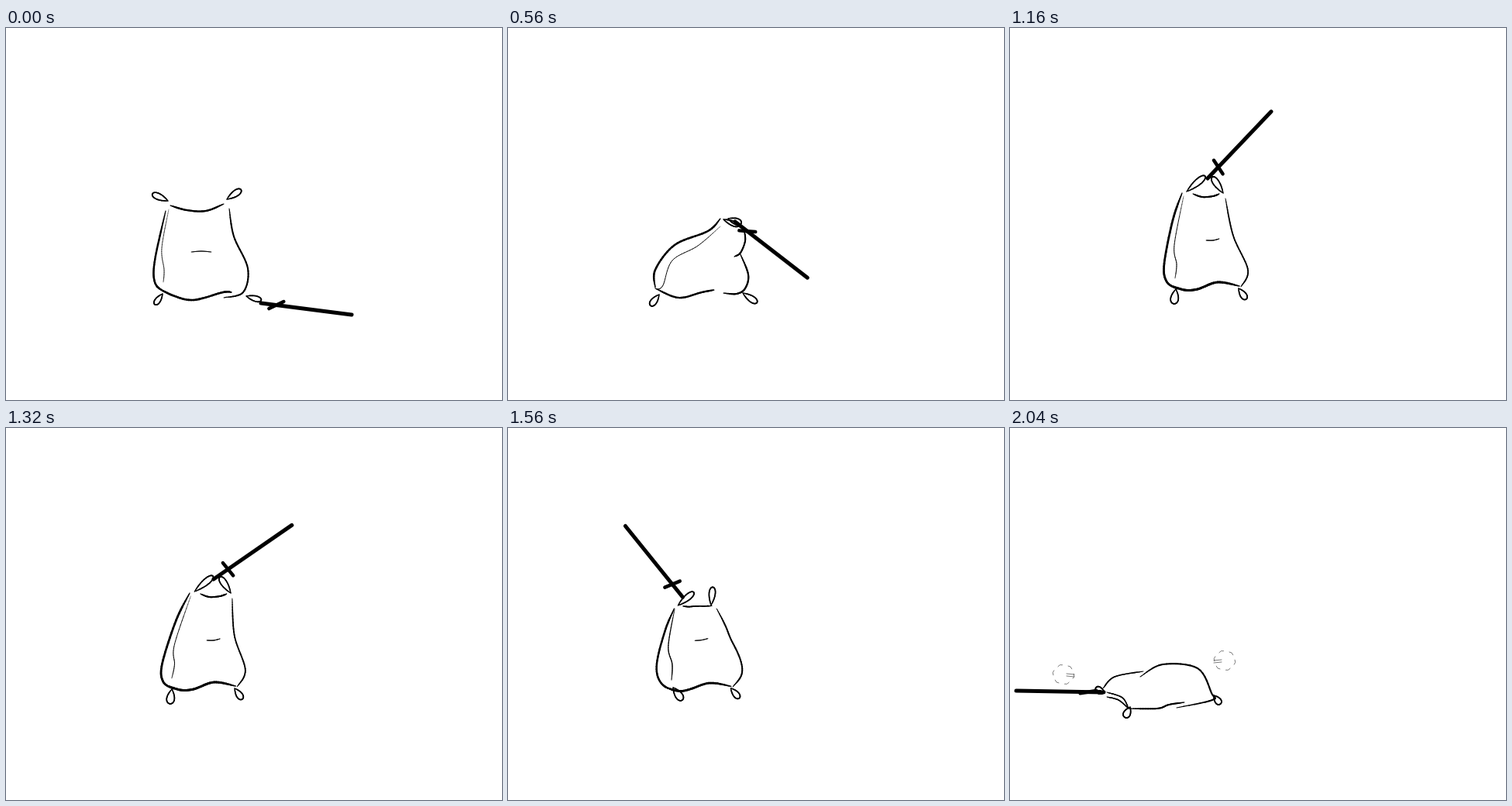
An HTML page with a canvas that plays this animation: 640x480 px, repeating every 2200 ms.

```html
<!DOCTYPE html>
<html>
<head>
<meta charset="utf-8">
<title>Sack with sword</title>
<style>
html, body { margin: 0; width: 100%; height: 100%; overflow: hidden; background: #fff; }
canvas { display: block; }
</style>
</head>
<body>
<canvas id="c" width="640" height="480"></canvas>
<script>
const ctx = document.getElementById('c').getContext('2d');
const LOOP = 2200, SAMPLES = 40, RAD = Math.PI / 180;

// From each start time on, drawings are held for the given time.
const beats = [[0, 120], [120, 40], [280, 120], [400, 80], [640, 40], [800, 280], [1080, 40],
  [1200, 80], [1360, 40], [1680, 80], [1920, 120]];

// curves: width, then key points of top, left, bottom, right, seam, crease.
// leaves: x, y, angle, length, half width of the two ears and two feet.
const rest = {
  curves: [
    [2.3, 212,229, 233,235, 258,236, 281,227],
    [2.4, 206,236, 192,300, 192,328, 203,340],
    [2.6, 194,334, 215,345, 242,351, 280,341, 291,341],
    [2.1, 288,233, 294,269, 312,310, 306,341, 281,348],
    [0.7, 210,234, 201,284, 204,312, 203,328],
    [0.9, 239,289, 252,288, 265,289]],
  leaves: [[209,223, -156,22,4], [285,221, -34,22,4], [202,343, 126,17,3.5], [310,346, 15,20,3.5]]
};
const bow = {
  curves: [
    [2.1, 302,324, 312,320, 328,320],
    [2.6, 333,314, 305,296, 274,281, 240,288, 200,295, 182,322, 190,340],
    [2.1, 205,346, 258,346, 275,344, 295,345],
    [1, 299,326, 296,340],
    [2.1, 296,333, 268,315, 240,303, 208,308, 200,325, 201,338],
    [0.9, 235,306, 245,311, 257,314]],
  leaves: [[333,315, 78,25,4.5], [298,329, 34,25,5], [199,343, 146,26,4], [295,341, 19,28,4]]
};
const grab = {
  curves: [
    [2, 305,262, 306,275, 300,290, 292,295],
    [2.5, 274,246, 258,262, 215,280, 190,312, 190,335],
    [2.3, 190,336, 220,348, 250,341, 266,338],
    [2.2, 299,290, 310,318, 306,336, 295,343, 278,342],
    [0.9, 274,256, 245,281, 212,300, 200,332, 192,337],
    [0, 250,285, 266,285]],
  leaves: [[278,247, 23,21,3], [284,246, 19,18,4], [195,344, 128,18,4], [303,342, 34,22,4]]
};
const raise = {
  curves: [
    [2, 236,214, 248,218, 262,217, 270,214],
    [2.7, 222,213, 210,248, 199,304, 202,327, 216,337],
    [3, 207,332, 225,338, 242,337, 268,328, 296,333],
    [1.8, 278,220, 288,268, 307,312, 298,334],
    [0.9, 224,217, 212,280, 215,305, 213,323],
    [0.9, 253,274, 262,274, 270,272]],
  leaves: [[228,211, -40,31,4], [275,213, -124,25,4], [214,337, 98,19,5], [295,336, 55,17,4]]
};
const dive = {
  curves: [
    [1.2, 152,259, 165,252, 196,258],
    [2, 145,270, 157,298, 182,330, 205,341],
    [2.3, 192,338, 212,341, 240,331, 272,334],
    [2.3, 202,257, 250,276, 277,286, 288,315, 275,334],
    [1.9, 146,263, 178,284, 197,304, 204,330],
    [0.7, 197,275, 213,271]],
  leaves: [[147,262, -40,18,3.5], [183,257, -12,20,4], [211,331, -27,22,4], [273,335, 40,17,3.5]]
};
const flat = {
  curves: [
    [1.6, 120,336, 135,321, 172,314],
    [1.5, 125,347, 140,351, 153,362],
    [2, 153,362, 190,362, 205,357, 225,354],
    [2.1, 168,321, 197,305, 242,310, 260,342, 261,351, 215,361],
    [1.5, 125,341, 145,348, 153,362],
    [0, 180,330, 196,328]],
  leaves: [[121,339, -165,11,3.5], [121,342, -170,8,2], [155,360, 116,15,4.5], [263,345, 53,14,4]]
};

// Leans a standing pose: the higher a point, the further it moves.
function bend(pose, by) {
  const dx = y => by * (Math.max(0, 340 - y) / 127) ** 1.4;
  return {
    curves: pose.curves.map(c => c.map((v, i) => i % 2 ? v + dx(c[i + 1]) : v)),
    leaves: pose.leaves.map(([x, y, ...r]) => [x + dx(y), y, ...r])
  };
}
const lean = bend(raise, 30);

const sackKeys = [[80, rest], [280, bow], [340, bow], [560, grab], [610, grab], [800, raise],
  [1160, raise], [1400, lean], [1480, lean], [1680, dive], [1750, dive], [1840, flat]];

// Sword: hilt x, y, angle, length, place and turn of the guard.
const held = [293,250, 37.7,118, 20,-33], aim = [281,196, -22.9,126, 25,-112];
const up = [252,195, -88,116, 20,-70], thrust = [146,261, -195,82, -20,8];
const swordKeys = [[340, [329,355, 7.3,118, 20,-33]], [560, held], [630, held],
  [680, [270,228, 4,114, 20,-50]], [800, up], [1040, up], [1160, [255,194, -46.4,119, 20,-77]],
  [1400, aim], [1480, aim], [1600, [206,226, -166,115, 20,-60]],
  [1680, thrust], [1750, thrust], [1840, [121,341, -179,113, 20,-10]]];

const lerp = (a, b, u) => a + (b - a) * u;
const mixList = (a, b, u) => a.map((v, i) => lerp(v, b[i], u));

function tween(keys, t, mix) {
  let i = keys.findIndex(k => k[0] > t);
  if (i < 0) i = keys.length;
  const a = keys[Math.max(i - 1, 0)], b = keys[Math.min(i, keys.length - 1)];
  const u = a === b ? 0 : (t - a[0]) / (b[0] - a[0]);
  return mix(a[1], b[1], u * u * (3 - 2 * u));
}

// Even samples along a Catmull-Rom curve, with the width in front.
function resample(s) {
  const n = (s.length - 1) / 2, out = [s[0]];
  const at = (i, k) => s[1 + 2 * Math.min(Math.max(i, 0), n - 1) + k];
  for (let j = 0; j <= SAMPLES; j++) {
    const p = j / SAMPLES * (n - 1), i = Math.min(Math.floor(p), n - 2), u = p - i;
    for (let k = 0; k < 2; k++) {
      const a = at(i - 1, k), b = at(i, k), c = at(i + 1, k), d = at(i + 2, k);
      out.push(b + u * (c - a + u * (2 * a - 5 * b + 4 * c - d + u * (3 * (b - c) + d - a))) / 2);
    }
  }
  return out;
}

const mixPose = (a, b, u) => ({
  curves: a.curves.map((s, i) => mixList(resample(s), resample(b.curves[i]), u)),
  leaves: a.leaves.map((l, i) => mixList(l, b.leaves[i], u))
});

function line(w, x1, y1, x2, y2) {
  ctx.lineWidth = w;
  ctx.beginPath();
  ctx.moveTo(x1, y1);
  ctx.lineTo(x2, y2);
  ctx.stroke();
}

// Pen stroke that thins out at both ends.
function ink(s) {
  if (s[0] < 0.2) return;
  for (let j = 0; j < SAMPLES; j++) {
    const u = (j + 0.5) / SAMPLES;
    const w = s[0] * (0.45 + 0.55 * Math.min(1, 6 * u, 6 * (1 - u)));
    line(w, ...s.slice(1 + 2 * j, 5 + 2 * j));
  }
}

// Teardrop with its point at x, y.
function leaf([x, y, deg, len, fat]) {
  const c = Math.cos(deg * RAD), s = Math.sin(deg * RAD), pts = [1.7];
  for (let j = 0; j <= SAMPLES; j++) {
    const v = j / SAMPLES * 2 * Math.PI;
    const p = len * (1 - Math.cos(v)) / 2, q = fat * Math.sin(v) * Math.sin(v / 2) * 1.3;
    pts.push(x + p * c - q * s, y + p * s + q * c);
  }
  ink(pts);
}

function sword([x, y, deg, len, along, turn]) {
  const c = Math.cos(deg * RAD), s = Math.sin(deg * RAD), g = (deg + turn) * RAD;
  const gx = x + along * c, gy = y + along * s, dx = 10.5 * Math.cos(g), dy = 10.5 * Math.sin(g);
  line(5, x, y, x + len * c, y + len * s);
  line(4.5, gx - dx, gy - dy, gx + dx, gy + dy);
}

// Ring of broken scallops with two dashes on one side.
function puff(x, y, side, grow) {
  ctx.lineWidth = 0.7;
  for (let i = 0; i < 6; i++) {
    const a = i * Math.PI / 3 + 0.2;
    ctx.beginPath();
    ctx.arc(x + 9 * grow * Math.cos(a), y + 8 * grow * Math.sin(a), 5 * grow, a - 0.7, a + 0.6);
    ctx.stroke();
  }
  for (const d of [-1, 2]) line(0.7, x + side * 4, y + d, x + side * 14, y + d + 1);
}

function draw(t) {
  ctx.fillStyle = '#fff';
  ctx.fillRect(0, 0, 640, 480);
  ctx.strokeStyle = '#000';
  ctx.lineCap = 'round';
  const sack = tween(sackKeys, t, mixPose);
  sack.curves.forEach(ink);
  sack.leaves.forEach(leaf);
  sword(tween(swordKeys, t, mixList));
  if (t >= 1360 && t < 1480) {
    line(0.8, 223, 212, 238, 216);
    line(0.8, 228, 220, 236, 221);
  }
  if (t >= 1840) {
    const grow = Math.min(1, lerp(0.6, 1, (t - 1840) / 200));
    ctx.strokeStyle = '#444';
    puff(69, 318, 1, grow);
    puff(277, 300, -1, grow);
  }
}

function hold(t) {
  const [from, step] = beats.filter(b => b[0] <= t).pop();
  return from + Math.floor((t - from) / step) * step;
}

const start = performance.now();
function frame() {
  draw(hold((performance.now() - start) % LOOP));
  requestAnimationFrame(frame);
}
frame();
</script>
</body>
</html>
```
